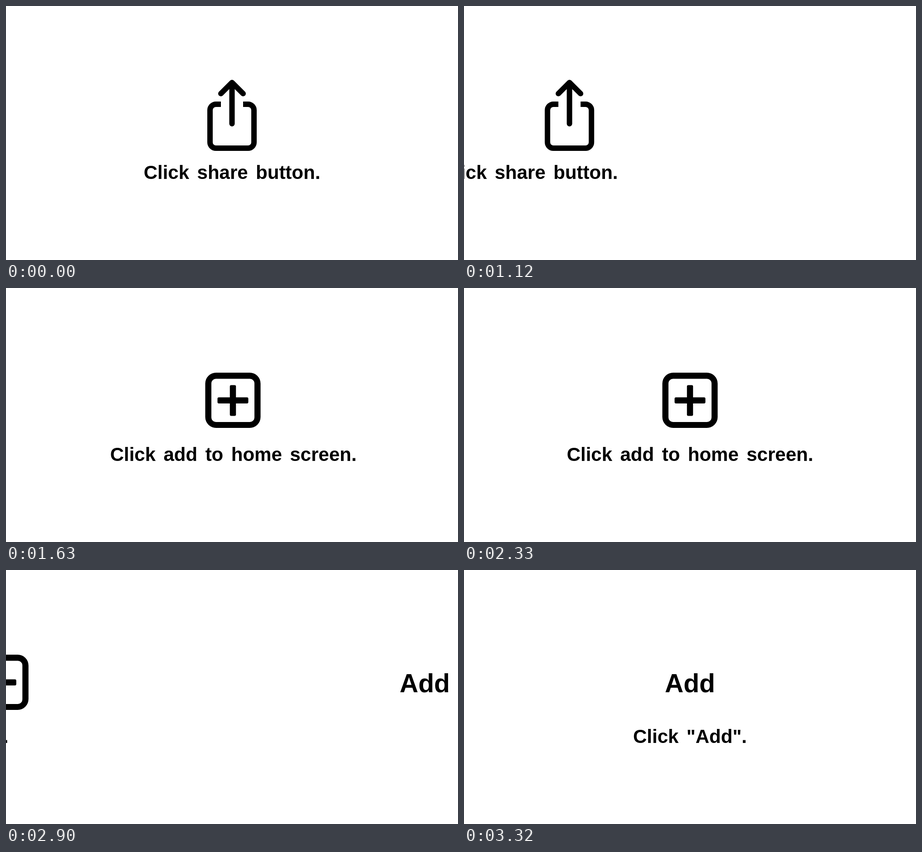
Recreate the animation shown at these times as an HTML page with a canvas. Size 997 by 561 pixels, loop 4110 ms.

```html
<!DOCTYPE html>
<html lang="en">
<head>
<meta charset="utf-8">
<title>Add to home screen</title>
<style>
  html, body { margin: 0; width: 100%; height: 100%; overflow: hidden; background: #fff; }
  canvas { display: block; }
</style>
</head>
<body>
<canvas id="stage" width="997" height="561"></canvas>
<script>
const ctx = document.getElementById('stage').getContext('2d');
const LOOP = 4110, STEP = 30, CENTER = 498.5;
const ICON_TRAVEL = 935, TEXT_TRAVEL = 1403;

// cubic-bezier(.42, 0, .58, 1)
function easeInOut(p) {
  if (p <= 0) return 0;
  if (p >= 1) return 1;
  let low = 0, high = 1;
  for (let i = 0; i < 30; i++) {
    const u = (low + high) / 2, v = 1 - u;
    const x = 3 * v * v * u * 0.42 + 3 * v * u * u * 0.58 + u * u * u;
    if (x < p) low = u; else high = u;
  }
  return 3 * low * low - 2 * low * low * low;
}

// Motion advances in fixed steps; the first slide rests just short of its end.
function stepTime(t) {
  const snap = from => from + STEP * Math.floor((t - from) / STEP);
  if (t < 760) return 0;
  if (t < 2330) return Math.min(1630, snap(760));
  return Math.min(3320, snap(2330));
}

function at(x, draw) {
  ctx.save();
  ctx.translate(x, 0);
  draw();
  ctx.restore();
}

function label(text, x, y, size) {
  ctx.font = `bold ${size}px "Liberation Sans", Arial, sans-serif`;
  ctx.wordSpacing = '5.8px';
  ctx.fillText(text, x, y);
}

const caption = (text, offset) => label(text, CENTER + offset, 382, 42);

function shareIcon() {
  ctx.lineWidth = 12;
  ctx.lineCap = 'butt';
  ctx.beginPath();
  ctx.moveTo(-24.5, 217);
  ctx.arcTo(-48.5, 217, -48.5, 314, 13);
  ctx.arcTo(-48.5, 314, 48.5, 314, 13);
  ctx.arcTo(48.5, 314, 48.5, 217, 13);
  ctx.arcTo(48.5, 217, 24.5, 217, 13);
  ctx.lineTo(24.5, 217);
  ctx.stroke();
  ctx.lineCap = ctx.lineJoin = 'round';
  ctx.beginPath();
  ctx.moveTo(-24.5, 193.5);
  ctx.lineTo(0, 169);
  ctx.lineTo(24.5, 193.5);
  ctx.moveTo(0, 169);
  ctx.lineTo(0, 260);
  ctx.stroke();
}

function plusIcon() {
  ctx.beginPath();
  ctx.roundRect(-61, 187, 122, 122, 24);
  ctx.roundRect(-47.5, 200.5, 95, 95.5, 10);
  ctx.fill('evenodd');
  ctx.beginPath();
  ctx.roundRect(-34, 241.5, 68, 13.5, 3);
  ctx.roundRect(-6.75, 214.5, 13.5, 68, 3);
  ctx.fill();
}

function render(t) {
  const time = stepTime(t);
  const first = easeInOut((time - 760) / 900);
  const second = time >= 3320 ? 1 : easeInOut((time - 2420) / 912);
  const middle = 1 - first - second;

  ctx.fillStyle = '#fff';
  ctx.fillRect(0, 0, 997, 561);
  ctx.fillStyle = ctx.strokeStyle = '#000';
  ctx.textAlign = 'center';

  at(CENTER - first * 801, shareIcon);
  caption('Click share button.', -first * 1066);

  at(CENTER + middle * ICON_TRAVEL, plusIcon);
  caption('Click add to home screen.', middle * TEXT_TRAVEL);

  label('Add', CENTER + (1 - second) * ICON_TRAVEL, 270, 57);
  caption('Click "Add".', (1 - second) * TEXT_TRAVEL);
}

const start = performance.now();
function tick() {
  render((performance.now() - start) % LOOP);
  requestAnimationFrame(tick);
}
tick();
</script>
</body>
</html>
```
